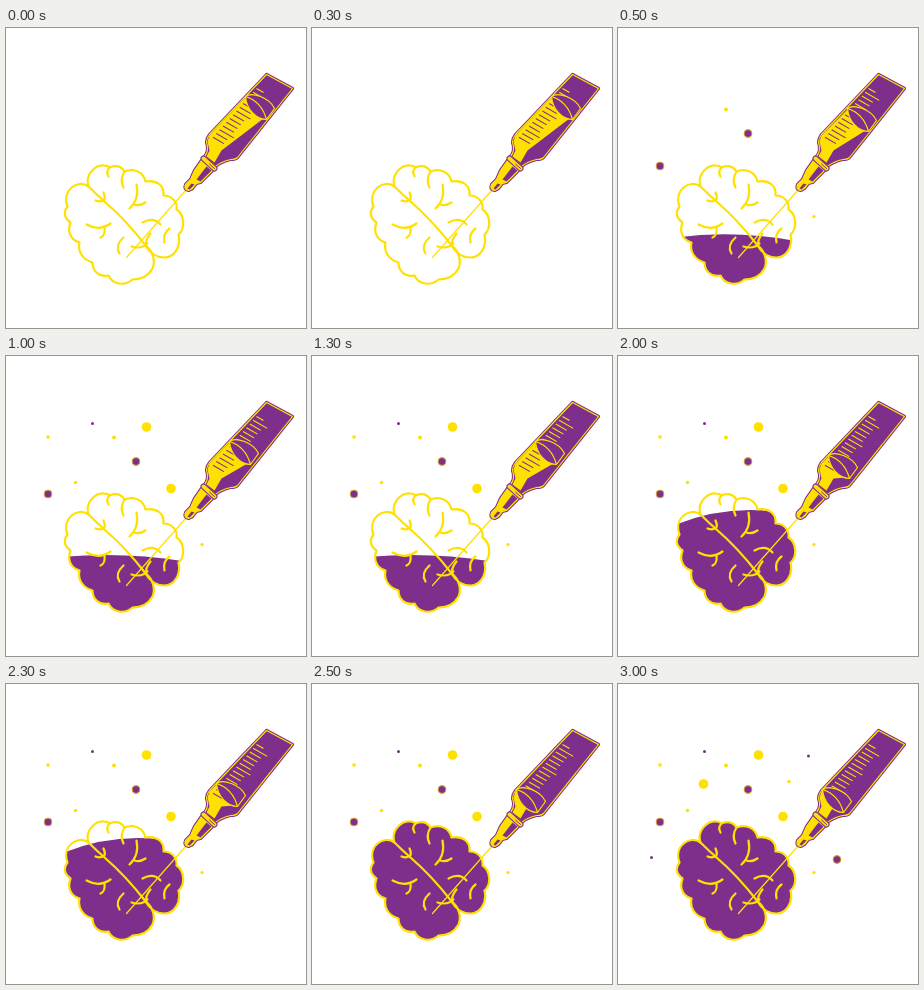
An HTML page that plays this animation: 300 px wide and 300 px high, repeating every 3.5 s.

```html
<!DOCTYPE html>
<html lang="en">
<head>
<meta charset="utf-8">
<title>Brain injection</title>
<style>
html, body { margin: 0; width: 100%; height: 100%; overflow: hidden; background: #fff; }
svg { display: block; width: 100vw; height: 100vh; }
.line { fill: none; stroke: #ffe100; stroke-width: 2.2; stroke-linecap: round; stroke-linejoin: round; }
.thin { stroke-width: 1.2; }
.purple { fill: #7e2f8c; }
.yellow { fill: #ffe100; }
.edge { fill: #7e2f8c; stroke: #7e2f8c; stroke-width: 3.2; stroke-linejoin: round; }
.ring { stroke: #d9a53a; stroke-width: 1; }
</style>
</head>
<body>
<svg viewBox="0 0 300 300">
  <defs>
    <path id="brain" d="M82 158C78 146 89 136 98 137Q101 137 103 139Q113 135 118 143C128 139 137 144 139 153C150 151 158 157 157 167C166 167 171 174 170 181C178 186 179 200 172 206C175 219 167 229 158 229C150 229 143 224 139 217C147 223 149 233 146 240Q140 251 126 251C118 258 106 256 102 247C92 249 86 242 86 234C76 231 71 223 73 214C63 211 61 202 64 194C57 189 57 183 61 178C55 162 71 150 82 158Z"/>
    <clipPath id="inside"><use href="#brain"/></clipPath>
    <path id="barrel" d="M260 46L286 60L231 129Q229 131 224 131Q215 133 209 138L198 128Q203 122 200 114Q200 110 203 106Z"/>
    <path id="nozzle" d="M195 132L188 142L184 151L179 156Q177 161 182 162L186 160L190 155L194 154L207 141Z"/>
  </defs>
  <g transform="translate(.5 .5)">
    <g id="dots"></g>
    <path id="fill" class="purple" clip-path="url(#inside)"/>
    <use href="#brain" class="line"/>
    <path class="line" d="M82 158Q89 165 98 173Q119 191 140 218M89 172Q95 174 98 171Q99 168 97 164M103 139Q99 143 102 148M118 143Q113 151 117 159M130 156Q133 171 123 180M128 176Q133 178 139 174M80 196Q93 203 104 195M98 199Q99 207 94 209M136 194Q147 188 154 196M163 200Q156 205 158 214M117 209Q108 217 113 225M125 218Q135 221 141 215M144 205Q138 212 140 218"/>
    <path class="line thin" d="M120 229L180 161"/>
    <use href="#nozzle" class="edge"/>
    <use href="#nozzle" class="line thin" style="fill:#ffe100"/>
    <path class="purple" d="M200 138L205 142L194 153L190 151ZM185 155L188 156L183 161L181 160Z"/>
    <use href="#barrel" class="edge"/>
    <use href="#barrel" class="line thin" style="fill:#7e2f8c"/>
    <path id="liquid" class="yellow"/>
    <g id="ticks"></g>
    <g id="plunger">
      <path class="line thin" style="fill:#7e2f8c" d="M-14 -10C-8 -15 10 -9 15 2L7 13C-4 13 -13 2 -14 -10Z"/>
      <path class="line thin" d="M-14 -10Q2 -5 7 13"/>
    </g>
    <g class="line">
      <path d="M197 130L208 140" stroke="#7e2f8c" stroke-width="6"/>
      <path d="M197 130L208 140" stroke-width="4"/>
      <path d="M203 135.500L208 140" stroke="#7e2f8c" stroke-width="1"/>
    </g>
  </g>
</svg>
<script>
const $ = id => document.getElementById(id);
const STEP = 500, STEPS = 7;

// Liquid surface in the brain: left, control and right heights
const levels = [[270, 270, 270], [210, 200, 214], [201, 194, 206], [183, 176, 183],
  [171, 142, 161], [120, 120, 120], [120, 120, 120]];
const plungers = [[253, 78], [243, 90], [237, 95], [231, 102], [224, 109], [218, 115], [218, 115]];

// First step shown, x, y, radius, colour
const dots = [
  [1, 107.5, 81, 1.9, 'yellow'], [1, 129.5, 105, 3.9, 'purple'],
  [1, 41.5, 137.5, 3.9, 'purple'], [1, 195.5, 188, 1.6, 'yellow'],
  [2, 41.5, 80.5, 1.8, 'yellow'], [2, 86, 67, 1.5, 'purple'],
  [2, 140, 70.5, 4.8, 'yellow'], [2, 69, 126, 1.7, 'yellow'], [2, 164.5, 132, 4.8, 'yellow'],
  [6, 85, 99.5, 4.8, 'yellow'], [6, 190, 71.5, 1.5, 'purple'],
  [6, 170.5, 97, 1.7, 'yellow'], [6, 218.5, 175, 3.9, 'purple'], [6, 33, 173, 1.5, 'purple']
];

function dot([from, x, y, r, color], step) {
  if (step < from) return '';
  const ring = color === 'purple' && r > 2 ? ' ring' : '';
  return `<circle class="${color}${ring}" cx="${x}" cy="${y}" r="${r}"/>`;
}

function tick(i, plungerY) {
  const x = 250 - 3.35 * i, y = 60 + 3.75 * i, length = i === 0 ? 7 : i % 5 === 1 ? 14 : 11;
  const color = y < plungerY - 8 ? '#ffe100' : '#7e2f8c';
  return `<path stroke="${color}" stroke-width="1.1" d="M${x} ${y}l${length} ${length * 0.58}"/>`;
}

function draw(step) {
  const [left, mid, right] = levels[step], [x, y] = plungers[step];
  $('fill').setAttribute('d', `M50 ${left}Q117 ${mid} 185 ${right}V270H50Z`);
  $('dots').innerHTML = dots.map(d => dot(d, step)).join('');
  $('liquid').setAttribute('d',
    `M${x - 14} ${y - 9}L203 107L201 113L203 122L200 128L208 134L215 122L${x + 4} ${y + 12}Z`);
  $('ticks').innerHTML = Array.from({ length: 14 }, (_, i) => tick(i, y)).join('');
  $('plunger').setAttribute('transform', `translate(${x} ${y})`);
}

let shown = -1;
function frame() {
  const step = Math.floor(performance.now() / STEP) % STEPS;
  if (step !== shown) draw(shown = step);
  requestAnimationFrame(frame);
}
frame();
</script>
</body>
</html>
```
